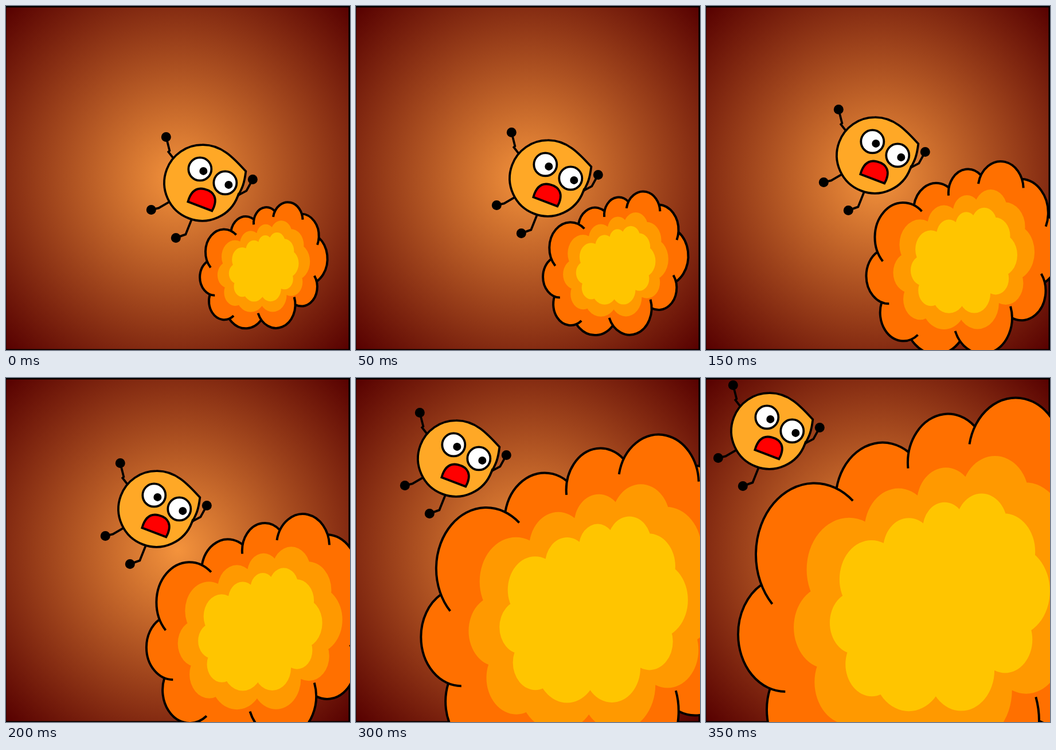
An HTML page with a canvas for the animation above (5.35 s loop, 600 by 600 pixels).

```html
<!DOCTYPE html>
<html lang="en">
<head>
<meta charset="utf-8">
<title>Blast</title>
<style>
html, body { margin: 0; height: 100%; overflow: hidden; background: #000; }
canvas { display: block; width: 600px; height: 600px; }
</style>
</head>
<body>
<canvas id="stage" width="600" height="600"></canvas>
<script>
const ctx = document.getElementById('stage').getContext('2d');
const LOOP = 5350, STEP = 50, LAST = 7;
const TALL = 1.22;  // puffs are circles stretched upwards
const CURL = 0.33;  // how far an outline runs on past a joint

// Puffs clockwise around the cloud centre: x, y, radius,
// and whether the outline laps over the next puff
const puffs = [
  [-220, -78, 102, true], [-101, -156, 82], [13, -209, 70], [131, -220, 82, true],
  [202, -150, 100, true], [231, -47, 118], [206, 80, 87], [66, 160, 106, true],
  [-101, 152, 115], [-219, 144, 84], [-271, 36, 82]
].map(([x, y, r, over = false]) => ({ x, y, r, over }));

// Key poses of the cloud
const poses = [
  { step: 0, x: 450, y: 459, size: 0.317 },
  { step: 2, x: 457, y: 454, size: 0.405 },
  { step: 4, x: 444, y: 445, size: 0.564 },
  { step: 5, x: 422, y: 425, size: 0.712 },
  { step: 7, x: 409, y: 403, size: 1 }
];

function background() {
  ctx.fillStyle = '#000';
  ctx.fillRect(0, 0, 600, 600);
  const g = ctx.createRadialGradient(300, 300, 0, 300, 300, 424);
  g.addColorStop(0, '#f4933c');
  g.addColorStop(1, '#560000');
  ctx.fillStyle = g;
  ctx.fillRect(0.5, 2.5, 597, 596);
}

function paint(fill) {
  ctx.fillStyle = fill;
  ctx.fill();
  ctx.stroke();
}

function disc(x, y, r) {
  ctx.beginPath();
  ctx.arc(x, y, r, 0, Math.PI * 2);
}

function dot(x, y, r) {
  disc(x, y, r);
  ctx.fillStyle = '#000';
  ctx.fill();
}

function limb(x, y, ...joints) {
  ctx.beginPath();
  ctx.moveTo(x, y);
  for (let i = 0; i < joints.length; i += 2) ctx.lineTo(joints[i], joints[i + 1]);
  ctx.stroke();
  dot(x, y, 8.5);
}

function eye(x, y) {
  disc(x, y, 20);
  paint('#fff');
  dot(x + 6, y + 3.5, 7);
}

function hero(dx, dy) {
  ctx.save();
  ctx.translate(dx + 0.3, dy + 0.4);
  ctx.strokeStyle = '#000';
  ctx.lineWidth = 3.8;

  limb(279, 228, 285, 252, 283, 254, 293, 267);
  limb(430, 302, 419, 322, 404, 330);
  limb(253, 355, 266, 352, 285, 341);
  limb(296, 404, 313, 398, 323, 373);

  ctx.beginPath();
  ctx.arc(342, 308, 66.2, 0.36, -Math.PI / 2);
  ctx.bezierCurveTo(376, 241, 398, 266, 418, 288);
  ctx.bezierCurveTo(415, 312, 411, 318, 404, 331.5);
  ctx.closePath();
  paint('#ffa826');

  eye(338, 284);
  eye(382, 308);

  ctx.beginPath();
  ctx.moveTo(317, 341);
  ctx.bezierCurveTo(323, 320, 334, 316, 346, 319);
  ctx.bezierCurveTo(362, 323, 371, 335, 359, 357);
  ctx.closePath();
  paint('#f00');
  ctx.restore();
}

// Angle on puff a where it meets b; side is +1 for the previous puff, -1 for the next
function joint(a, b, side) {
  const dx = b.x - a.x, dy = b.y - a.y, d = Math.hypot(dx, dy);
  const spread = Math.acos((d * d + a.r * a.r - b.r * b.r) / (2 * d * a.r));
  return Math.atan2(dy, dx) + side * spread;
}

function body() {
  ctx.beginPath();
  for (const p of puffs) ctx.lineTo(p.x, p.y);
  ctx.closePath();
  for (const p of puffs) {
    ctx.moveTo(p.x + p.r, p.y);
    ctx.arc(p.x, p.y, p.r, 0, Math.PI * 2);
  }
}

function outline() {
  ctx.beginPath();
  puffs.forEach((p, i) => {
    const prev = puffs.at(i - 1), next = puffs[(i + 1) % puffs.length];
    const from = joint(p, prev, 1) - (prev.over ? 0 : CURL);
    const to = joint(p, next, -1) + (p.over ? CURL : 0);
    ctx.moveTo(p.x + p.r * Math.cos(from), p.y + p.r * Math.sin(from));
    ctx.arc(p.x, p.y, p.r, from, to);
  });
}

// Builds a path at the cloud's place and scale, leaving line widths unscaled
function trace(path, { x, y, size }, k) {
  ctx.save();
  ctx.translate(x, y);
  ctx.scale(size * k, size * k * TALL);
  path();
  ctx.restore();
}

function layer(pose, k, fill) {
  trace(body, pose, k);
  ctx.fillStyle = fill;
  ctx.fill();
}

function cloud(pose) {
  layer(pose, 1, '#ff7000');
  trace(outline, pose, 1);
  ctx.strokeStyle = '#000';
  ctx.lineWidth = 4;
  ctx.stroke();
  layer(pose, 0.725, '#ff9900');
  layer(pose, 0.547, '#ffc500');
}

function poseAt(step) {
  const i = Math.max(1, poses.findIndex(p => p.step >= step));
  const a = poses[i - 1], b = poses[i];
  const u = (step - a.step) / (b.step - a.step);
  const mix = key => a[key] + (b[key] - a[key]) * u;
  return { x: mix('x'), y: mix('y'), size: mix('size') };
}

function draw(t) {
  const step = Math.min(LAST, Math.floor(t / STEP));
  const shift = -4 * step * (step + 1);  // speeds up by 8 px per step
  const veer = step === LAST ? 8 : 0;
  background();
  hero(shift - veer, shift + veer);
  cloud(poseAt(step));
}

const start = performance.now();
function tick() {
  draw((performance.now() - start) % LOOP);
  requestAnimationFrame(tick);
}
tick();
</script>
</body>
</html>
```
